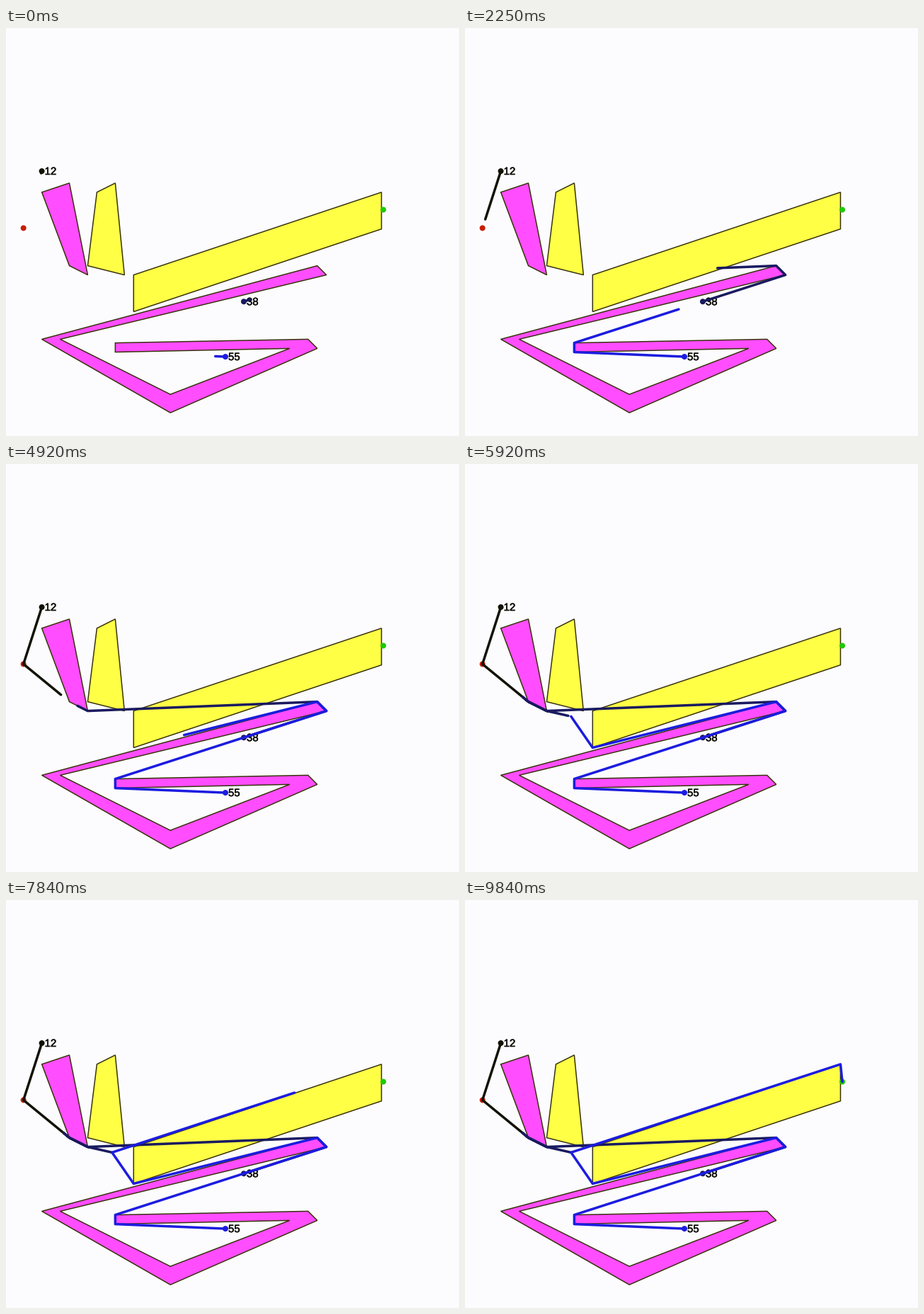
Recreate the animation shown at these times as a matplotlib script. Size 640x576 px, loop 9.93 s.

```python
import numpy as np
import matplotlib.pyplot as plt
from matplotlib.animation import FuncAnimation
from matplotlib.patheffects import withStroke

W, H, DPI = 640, 576, 100
FRAMES, LOOP_MS = 119, 9930
PX = 72 / DPI

# Everything is placed on a square grid: cell size and origin in pixels.
CELL, X0, Y0 = 12.97, 50.6, 218.9

RATE = 0.017    # cells per frame for each unit of a carrier's label
TURN = 0.2      # frames lost on each leg
START = -1.2    # departure, in frames

MAGENTA, YELLOW, EDGE, INK = "#ff4dff", "#ffff46", "#37310a", "#0c0c04"

fig = plt.figure(figsize=(W / DPI, H / DPI), dpi=DPI, facecolor="#fcfcfe")
ax = fig.add_axes([0, 0, 1, 1])
ax.set_xlim(-X0 / CELL, (W - X0) / CELL)
ax.set_ylim((H - Y0) / CELL, -Y0 / CELL)
ax.axis("off")


def obstacle(fill, *corners):
    ax.add_patch(plt.Polygon(corners, fc=fill, ec=EDGE, lw=1.5 * PX, zorder=1))


def dot(point, color):
    ax.add_patch(plt.Circle(point, 4 / CELL, fc=color, lw=0, zorder=2))


def timed(route, label, start):
    """Rows of (time, x, y) for a route walked at the label's speed."""
    route = np.array(route, float)
    legs = np.hypot(*np.diff(route, axis=0).T)
    spent = np.cumsum(legs / (RATE * label) + TURN)
    return np.column_stack([start + np.append(0, spent), route])


def trail(plan, t):
    """Points passed by time t, plus the current position."""
    times, xs, ys = plan.T
    done = times < t
    return (np.append(xs[done], np.interp(t, times, xs)),
            np.append(ys[done], np.interp(t, times, ys)))


def carrier(plan, label, color):
    x, y = plan[0, 1:]
    dot((x, y), color)
    ax.text(x + 4 / CELL, y + 5 / CELL, str(label), family="Liberation Sans",
            size=15 * PX, color=INK, va="baseline", zorder=3,
            path_effects=[withStroke(linewidth=0.5 * PX, foreground=INK)])
    line, = ax.plot([], [], color=color, lw=3.5 * PX, zorder=4,
                    solid_capstyle="round", solid_joinstyle="round")
    return line, plan


obstacle(MAGENTA, (0, 1), (3, 0), (5, 10), (3, 9))
obstacle(YELLOW, (6, 1), (8, 0), (9, 10), (5, 9))
obstacle(YELLOW, (10, 10), (37, 1), (37, 5), (10, 14))
obstacle(MAGENTA, (0, 17), (30, 9), (31, 10), (2, 17), (14, 23), (27, 18),
         (8, 18.4), (8, 17.4), (29, 17), (30, 18), (14, 25))

source, goal = (-2, 4.9), (37.2, 2.9)
dot(source, "#c81e00")
dot(goal, "#1ec80a")

# The slow carrier fetches the parcel, the middle one meets it and
# brings it to the fast one, which delivers it.
pickup, relay = (2.4, 8.5), (7.65, 10.6)
slow = timed([(0, -1.3), source, pickup], 12, START)
middle = timed([(22, 12.9), (31, 10), (30, 9), (5, 10), (3, 9), pickup,
                (3, 9), (5, 10), relay], 38, START)
fast = np.vstack([
    timed([(20, 18.9), (8, 18.4), (8, 17.4), (31, 10), (30, 9), (10, 14),
           relay], 55, START),
    timed([relay, (37, 1), goal], 55, middle[-1, 0]),
])

carriers = [carrier(slow, 12, "#121205"),
            carrier(middle, 38, "#1a1a60"),
            carrier(fast, 55, "#1c1ce0")]


def draw(frame):
    t = frame - (frame >= 36)  # one held step
    for line, plan in carriers:
        line.set_data(*trail(plan, t))
    return [line for line, _ in carriers]


def reset():
    return draw(0)


anim = FuncAnimation(fig, draw, frames=FRAMES, init_func=reset,
                     interval=LOOP_MS / FRAMES, repeat=True, repeat_delay=0)
plt.show()
```
